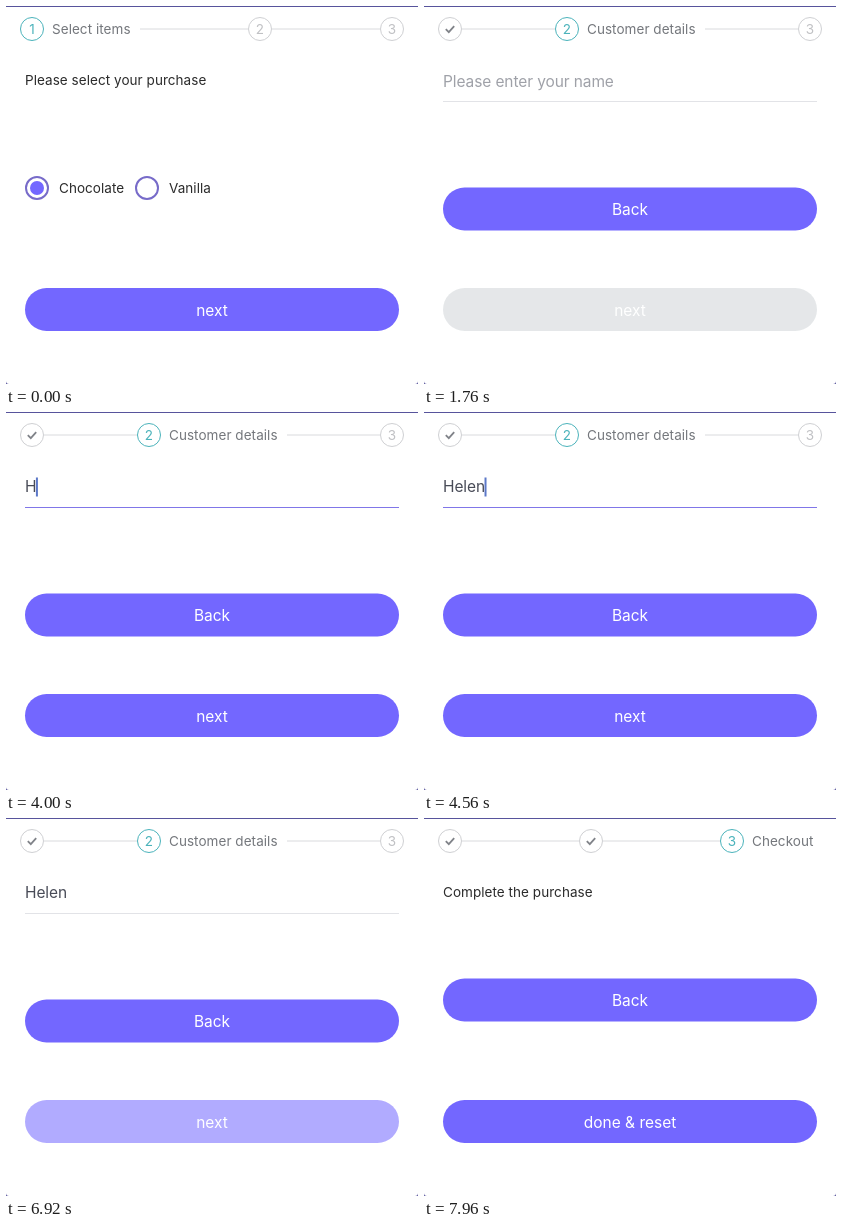
Recreate the animation shown at these times as an HTML page. Size 412x378 px, loop 8000 ms.

```html
<!DOCTYPE html>
<html lang="en">
<head>
<meta charset="utf-8">
<title>Checkout steps</title>
<style>
  html, body { margin: 0; height: 100%; overflow: hidden; background: #57549c; }
  svg { display: block; width: 412px; height: 378px; }
  text { font: 13.5px Inter, Roboto, sans-serif; letter-spacing: .05px; fill: #2b2b2b; }
  .mid { text-anchor: middle; }
  .label { fill: #74777c; }
  .field { font-size: 15.5px; letter-spacing: -.1px; fill: #484b57; }
  .hint { fill: #9fa1a8; }
  .cap { font-size: 15.5px; letter-spacing: 0; fill: #fff; text-anchor: middle; }
  .line { stroke: #d9dadd; }
  .step { fill: #fff; stroke: #cfd0d3; }
  .num { fill: #c0c1c4; }
  .active .step { stroke: #4bb3bb; }
  .active .num { fill: #4bb3bb; }
  .check { fill: none; stroke: #808389; stroke-width: 1.8; }
  .ring { fill: #fff; stroke: #776bc9; stroke-width: 2; }
  .btn, .dot { fill: #7367ff; }
</style>
</head>
<body>
<svg viewBox="0 0 412 378">
  <path fill="#fff" d="M0 1H412V375Q412 378 409 378H3Q0 378 0 375Z"/>
  <g id="pages"></g>
  <g id="next">
    <rect class="btn" x="19" y="282" width="374" height="43" rx="21.5"/>
    <text class="cap" x="206" y="309.5"></text>
  </g>
</svg>
<script>
const LOOP = 8000, PICK = 680, FOCUS = 3160, BLUR = 6320;
const NAME = 'Helen', KEYS = [4000, 4120, 4240, 4400, 4560];
const PAGE2 = 1730, PAGE3 = 6980;
const $ = id => document.getElementById(id);
const ramp = (t, from, to) => Math.min(1, Math.max(0, (t - from) / (to - from)));

const text = (cls, x, y, s, id = '') => `<text id="${id}" class="${cls}" x="${x}" y="${y}">${s}</text>`;
const line = (x1, x2) => `<path class="line" d="M${x1} 23H${x2}"/>`;
const radio = (x, id, s) => `<circle class="ring" cx="${x}" cy="182" r="11"/>
  <circle id="${id}" class="dot" cx="${x}" cy="182" r="7"/>` + text('', x + 22, 186.5, s);
const button = (y, s) => `<rect class="btn" x="19" y="${y}" width="374" height="43" rx="21.5"/>`
  + text('cap', 206, y + 27.5, s);

// Step header: circle centres, the active step and its label
function header(xs, active, label, labelEnd) {
  const steps = xs.map((x, i) => `<g class="${i === active ? 'active' : ''}">
    <circle class="step" cx="${x}" cy="23" r="11.5"/>` + (i < active
      ? `<path class="check" d="M${x - 4.2} 23.2l3 3l5.4 -6"/>`
      : text('num mid', x, 28, i + 1)) + '</g>');
  const lines = [0, 1].map(i => line(i === active ? labelEnd : xs[i] + 12, xs[i + 1] - 12));
  return lines.join('') + steps.join('') + text('label', xs[active] + 20, 28, label);
}

$('pages').innerHTML = [
  header([26, 254, 386], 0, 'Select items', 134)
    + text('', 19, 78.5, 'Please select your purchase')
    + radio(31, 'dotA', 'Chocolate') + radio(141, 'dotB', 'Vanilla'),
  header([26, 143, 386], 1, 'Customer details', 281)
    + text('field hint', 19, 80.5, 'Please enter your name', 'hint')
    + text('field', 19, 80, '', 'typed')
    + '<path id="under" d="M19 95.5H393"/>'
    + '<rect id="caret" y="65.5" width="2" height="19" fill="#5c78c8"/>'
    + button(181.5, 'Back'),
  header([26, 167, 308], 2, 'Checkout')
    + text('', 19, 78.5, 'Complete the purchase')
    + button(160.5, 'Back')
].map(s => `<g>${s}</g>`).join('');

const pages = [...$('pages').children];
const [nextBox, nextCap] = $('next').children;

// Button dims while pressed, then recovers
const press = (t, down, up) => 1 - .45 * (ramp(t, down, down + 130) - ramp(t, up, up + 250));

function caretAlpha(t, count) {
  if (t < FOCUS || t >= BLUR) return 0;
  const age = (t - (count ? KEYS[count - 1] : FOCUS)) % 920;
  return 1 - ramp(age, 480, 600) + ramp(age, 840, 920);
}

function mix(a, b, k) {
  return `rgb(${a.map((v, i) => Math.round(v + (b[i] - v) * k))})`;
}

function draw(t) {
  const page = t < PAGE2 ? 0 : t < PAGE3 ? 1 : 2;
  pages.forEach((g, i) => g.style.display = i === page ? '' : 'none');

  const pick = ramp(t, PICK, PICK + 160);
  $('dotA').style.opacity = 1 - pick;
  $('dotB').style.opacity = pick;

  const count = KEYS.filter(k => t >= k).length;
  $('hint').style.display = count ? 'none' : '';
  $('typed').textContent = NAME.slice(0, count);
  const focus = ramp(t, FOCUS, FOCUS + 80) - ramp(t, BLUR, BLUR + 80);
  $('under').style.stroke = mix([226, 227, 231], [128, 118, 232], focus);
  if (page === 1) {
    $('caret').setAttribute('x', 19 + (count ? $('typed').getComputedTextLength() - .5 : 0));
    $('caret').style.opacity = caretAlpha(t, count);
  }

  nextBox.style.fill = page === 1 && !count ? '#d0d5d8' : '#7367ff';
  nextCap.textContent = page === 2 ? 'done & reset' : 'next';
  $('next').style.opacity = t < 4000 ? press(t, 1600, 1880) : press(t, 6770, 7100);
}

const start = performance.now();
function frame() {
  draw((performance.now() - start) % LOOP);
  requestAnimationFrame(frame);
}
frame();
</script>
</body>
</html>
```
